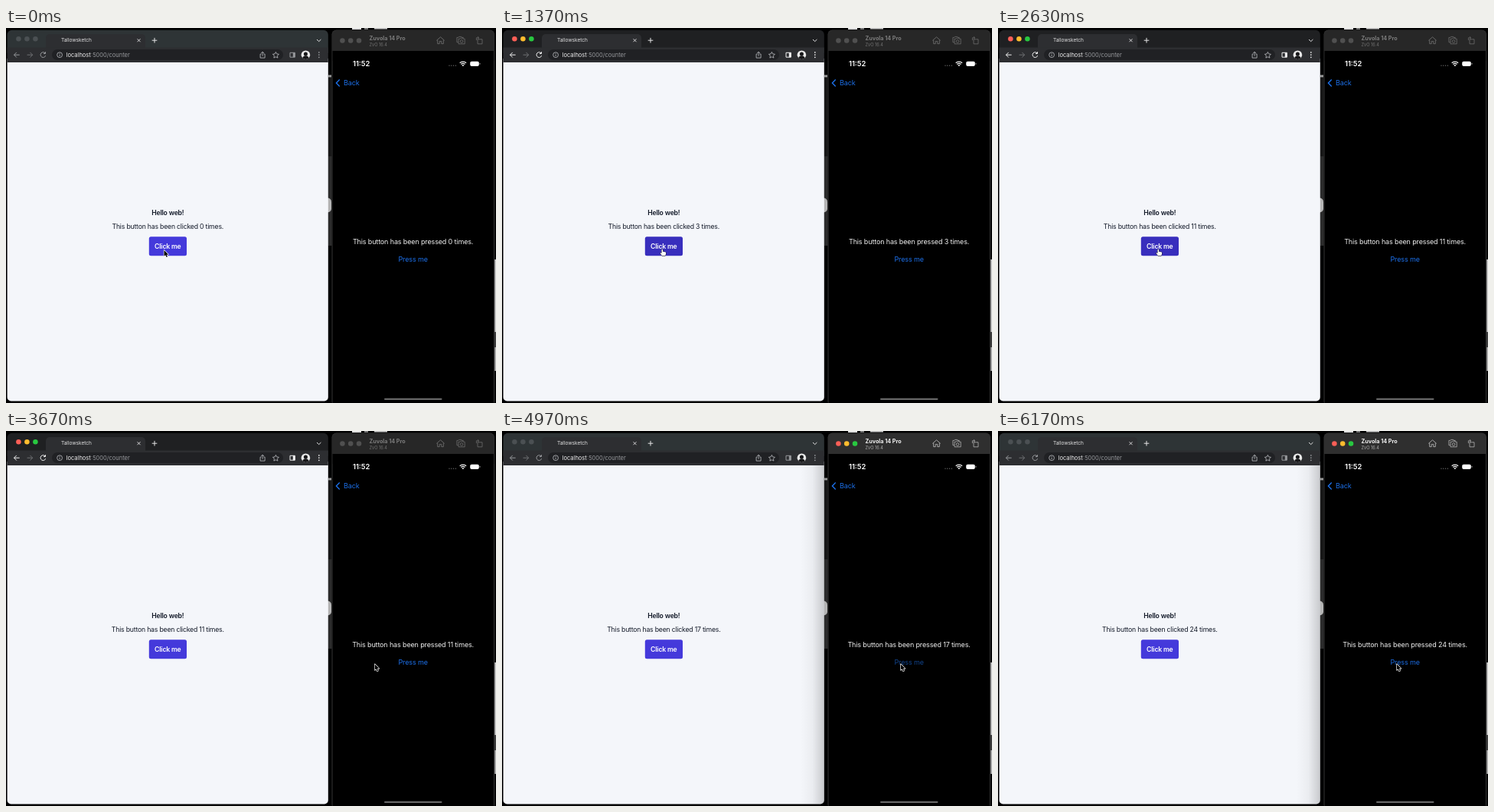
An HTML page with a canvas for the animation above (6210 ms loop, 640 by 491 pixels).

```html
<!DOCTYPE html>
<html lang="en">
<head>
<meta charset="utf-8">
<title>Shared counter</title>
<style>
html, body { margin: 0; width: 100%; height: 100%; overflow: hidden; background: #000; }
canvas { display: block; width: 640px; height: 491px; }
</style>
</head>
<body>
<canvas id="stage"></canvas>
<script>
const LOOP = 6210;
const canvas = document.getElementById('stage');
const ctx = canvas.getContext('2d');
const ratio = window.devicePixelRatio || 1;
canvas.width = 640 * ratio;
canvas.height = 491 * ratio;

const LIGHTS = ['#ff5f57', '#febc2e', '#28c840'];
const FOCUS_WEB = 150, HOVER_START = 300;
const MOVE_START = 2990, MOVE_END = 3865, FOCUS_PHONE = 3950;
const FIRST_PRESS = 4080, PRESS_GAP = 167, LAST_PRESS = FIRST_PRESS + 12 * PRESS_GAP;

const clamp = v => Math.max(0, Math.min(1, v));
const mix = (a, b, p) => a + (b - a) * p;
const smooth = p => p * p * (3 - 2 * p);

function rect(x, y, w, h, color, radius = 0) {
  ctx.fillStyle = color;
  ctx.beginPath();
  ctx.roundRect(x, y, w, h, radius);
  ctx.fill();
}

function disc(x, y, r, color) {
  ctx.fillStyle = color;
  ctx.beginPath();
  ctx.arc(x, y, r, 0, 7);
  ctx.fill();
}

function line(d, color, width = 1) {
  ctx.strokeStyle = color;
  ctx.lineWidth = width;
  ctx.stroke(new Path2D(d));
}

function text(str, x, y, size, color, { weight = 400, align = 'left', spacing = 0 } = {}) {
  ctx.font = `${weight} ${size}px Inter, "Liberation Sans", sans-serif`;
  ctx.letterSpacing = spacing + 'px';
  ctx.textAlign = align;
  ctx.fillStyle = color;
  ctx.fillText(str, x, y);
}

function windowLights(xs, y, focused, idle) {
  xs.forEach((x, i) => disc(x, y, 3.25, focused ? LIGHTS[i] : idle));
}

function countAt(t) {
  if (t < 930) return 0;
  if (t < 2330) return Math.min(9, 1 + Math.floor((t - 930) / 155.6));
  if (t < 2630) return 10;
  if (t < FIRST_PRESS) return 11;
  return Math.min(24, 12 + Math.floor((t - FIRST_PRESS) / PRESS_GAP));
}

// The link dims just before each release and brightens after it.
function linkOpacity(t) {
  const dim = 0.35;
  if (t < FIRST_PRESS - 80) return 1;
  if (t < FIRST_PRESS) return mix(1, dim, clamp((t - FIRST_PRESS + 80) / 60));
  const since = t >= LAST_PRESS ? t - LAST_PRESS : (t - FIRST_PRESS) % PRESS_GAP;
  if (since < 95 || t >= LAST_PRESS) return mix(dim, 1, Math.pow(clamp(since / 90), 2));
  return mix(1, dim, clamp((since - 95) / 60));
}

function cursorAt(t) {
  if (t < MOVE_START) {
    const p = smooth(clamp((t - 30) / 270));
    return [mix(206.5, 209.3, p), mix(291, 289.3, p)];
  }
  const p = smooth(clamp((t - MOVE_START) / (MOVE_END - MOVE_START)));
  return [mix(209.3, 520.8, p), mix(289.3, 305.3, Math.min(1, p * 1.3))];
}

function drawWallpaper() {
  rect(0, 0, 640, 491, '#000');
  rect(452, 0, 12, 2, '#ddd');
  rect(468, 0, 5, 2, '#777');
  rect(481, 0, 17, 1.5, '#ccc');
  rect(421, 61.5, 4, 3, '#999');
  rect(421, 65, 4.5, 103, '#171717');
  rect(421, 168, 4.5, 117, '#2b2b2b');
  rect(420, 222.5, 5, 19, '#b4b4b4', [0, 5, 5, 0]);
  rect(638.3, 303, 1.7, 95, '#cfcfcf');
  rect(638.3, 398, 1.7, 20, '#444');
  rect(638.3, 418, 1.7, 31, '#b5b5b5');
}

function drawToolbar(focused) {
  const bright = focused ? '#f2f2f2' : '#96989b';
  const light = '#e4e4e5';
  const muted = '#bfc1c4';
  const idle = '#6e7073';
  const bar = '#2d2e31';

  rect(1.6, 2.8, 419.2, 30, focused ? '#1f2022' : '#2e3436', [6, 6, 0, 0]);
  rect(52, 8, 130, 20, bar, [5, 5, 0, 0]);
  rect(1.6, 25.5, 419.2, 19.5, bar);
  rect(60, 28, 302, 14, '#202124', 7);
  windowLights([16.4, 27.4, 38.4], 14.2, focused, '#4b5053');

  text('Tallowsketch', 72, 18.4, 6.5, light);
  line('M171.5 14.2l4 4M175.5 14.2l-4 4', light, 0.9);
  line('M190.7 16.2h6.6M194 12.9v6.6', light);
  line('M406 15l2.7 2.6 2.7-2.6', light);

  line('M17.7 35.2H10.6M13.8 31.9l-3.3 3.3 3.3 3.3', bright);
  line('M27.6 35.2h7M31.4 31.9l3.3 3.3-3.3 3.3', idle);
  line('M51.2 33.1A3.4 3.4 0 1 0 51.7 36.2M51.5 31.2v2.4h-2.5', bright);
  line('M73.5 35.2a3.4 3.4 0 1 1-6.8 0 3.4 3.4 0 1 1 6.8 0M70.1 34.6v2.4M70.1 33v.8', muted, 0.8);

  text('localhost', 78.7, 37.9, 7.5, '#eeeeef');
  text(':5000/counter', 111, 37.9, 7.5, '#97999d');

  line('M333.6 34.1h-1.5v5h6v-5h-1.5M335.1 36.8v-5.6M333.3 33l1.8-1.8 1.8 1.8', muted, 0.8);
  line('M352.4 31.4l1.2 2.5 2.8.4-2 2 .5 2.8-2.5-1.3-2.5 1.3.5-2.8-2-2 2.8-.4z', muted, 0.8);
  line('M371 32.3h6.3v5.9H371z', bright, 1);
  rect(374.8, 32.3, 2.6, 5.9, bright);

  disc(391.4, 35.2, 5.8, '#e8e8e8');
  ctx.save();
  ctx.beginPath();
  ctx.arc(391.4, 35.2, 5.8, 0, 7);
  ctx.clip();
  disc(391.4, 34, 2.5, '#171719');
  disc(391.4, 41, 4.7, '#171719');
  ctx.restore();
  [31.9, 35.1, 38.3].forEach(y => disc(408.8, y, 0.85, bright));
}

function drawBrowser(count, focused, hover, shadow) {
  rect(1.6, 40, 419.2, 448.4, '#f4f6fa', [0, 0, 5, 5]);
  if (shadow) {
    const fade = ctx.createLinearGradient(390, 0, 421, 0);
    fade.addColorStop(0, 'rgba(0,0,0,0)');
    fade.addColorStop(0.5, 'rgba(0,0,0,.04)');
    fade.addColorStop(1, 'rgba(0,0,0,.18)');
    rect(390, 45, 30.8, 443.4, fade, [0, 0, 5, 0]);
  }
  drawToolbar(focused);

  const centered = { align: 'center', spacing: -0.2 };
  text('Hello web!', 211.3, 245.2, 8.7, '#111827', { ...centered, weight: 600 });
  text(`This button has been clicked ${count} times.`, 211.3, 262.5, 8.7, '#111827', centered);
  rect(186.8, 273.2, 49.2, 25, hover ? '#382ebd' : '#4439db', 2.5);
  text('Click me', 211.3, 289, 8.7, '#fff', { ...centered, weight: 600 });
}

function drawPhone(count, focused, opacity) {
  const icon = focused ? '#b2b2b2' : '#6d6d6d';
  rect(425.5, 2.5, 212.5, 492, '#353535', 6);
  rect(426, 3, 211.5, 40, focused ? '#2f2f2f' : '#272727', [6, 6, 0, 0]);
  rect(426.5, 30, 210.5, 461, '#000');
  windowLights([439.4, 450.2, 461], 16.5, focused, '#505050');
  text('Zuvola 14 Pro', 474.5, 16.2, 7.2, focused ? '#f2f2f2' : '#7c7c7c', { weight: 700 });
  text('ZvO 16.4', 474.5, 23.5, 5.6, focused ? '#aaa' : '#707070');

  line('M562.3 16.4l5.2-4.6 5.2 4.6M563.7 15.6v5h2.5v-3.2h2.6v3.2h2.5v-5', icon, 0.9);
  line('M590.7 18.6h-1.8v-6.2h2l.7-1h3.2l.7 1h1.7v1.4M591 14.2h2l.8-1h2.6l.8 1h2v6.6H591zM596.9 17.4a1.8 1.8 0 1 1-3.6 0 1.8 1.8 0 1 1 3.6 0', icon, 0.8);
  line('M616 14.8h6v6h-6zM614.4 16v-3.2h3M616 11.2l1.7 1.6-1.7 1.6', icon, 0.8);

  text('11:52', 453, 50.1, 9.3, '#fff', { weight: 600 });
  [579, 581.8, 584.6, 587.4].forEach(x => disc(x, 49.2, 0.65, '#777'));
  line('M592.7 45.7a6.2 6.2 0 0 1 8.4 0M594.3 47.5a4 4 0 0 1 5.2 0', '#fff', 1.2);
  disc(596.9, 49, 1, '#fff');
  rect(606.2, 43.7, 11.6, 6.2, '#fff', 2);
  rect(618.6, 45.7, 0.9, 2.2, '#888', 0.5);

  const blue = '#1c6fe8';
  line('M435.7 67.6l-4.3 4.4 4.3 4.4', blue, 1.4);
  text('Back', 441, 75.3, 9, blue, { spacing: -0.14 });
  const centered = { align: 'center', spacing: -0.14 };
  text(`This button has been pressed ${count} times.`, 531.6, 283.2, 9, '#f0f0f0', centered);
  ctx.globalAlpha = opacity;
  text('Press me', 531.6, 306.3, 9, blue, centered);
  ctx.globalAlpha = 1;
  rect(494, 484.8, 75.5, 2.3, '#666', 1.2);
}

function drawPointer([x, y], hand) {
  ctx.save();
  ctx.translate(x, y);
  ctx.lineJoin = 'round';
  const shape = new Path2D(hand
    ? 'M-.8.8Q0-.4.8.8V3.6Q1.5 3 2.2 3.8 3 3.3 3.5 4.1 4.7 3.8 4.8 5.2V6.6L3.8 9H-.2L-2.6 5.9Q-2.7 4.7-1.5 5.1L-.8 5.7Z'
    : 'M0 0V7.8L1.8 6.2 3 9.1 4.4 8.5 3.2 5.7H5.6Z');
  ctx.lineWidth = hand ? 0.9 : 1.3;
  ctx.strokeStyle = hand ? '#000' : '#fff';
  ctx.stroke(shape);
  ctx.fillStyle = hand ? '#fff' : '#000';
  ctx.fill(shape);
  ctx.restore();
}

function render(t) {
  const count = countAt(t);
  const pointer = cursorAt(t);
  const webFocused = t >= FOCUS_WEB && t < FOCUS_PHONE;
  const phoneFocused = t >= FOCUS_PHONE;
  const hover = t >= HOVER_START && pointer[0] < 235.8;

  ctx.setTransform(ratio, 0, 0, ratio, 0, 0);
  drawWallpaper();
  drawBrowser(count, webFocused, hover, phoneFocused);
  drawPhone(count, phoneFocused, linkOpacity(t));
  drawPointer(pointer, hover);
}

const start = performance.now();
function tick() {
  render((performance.now() - start) % LOOP);
  requestAnimationFrame(tick);
}
tick();
</script>
</body>
</html>
```
